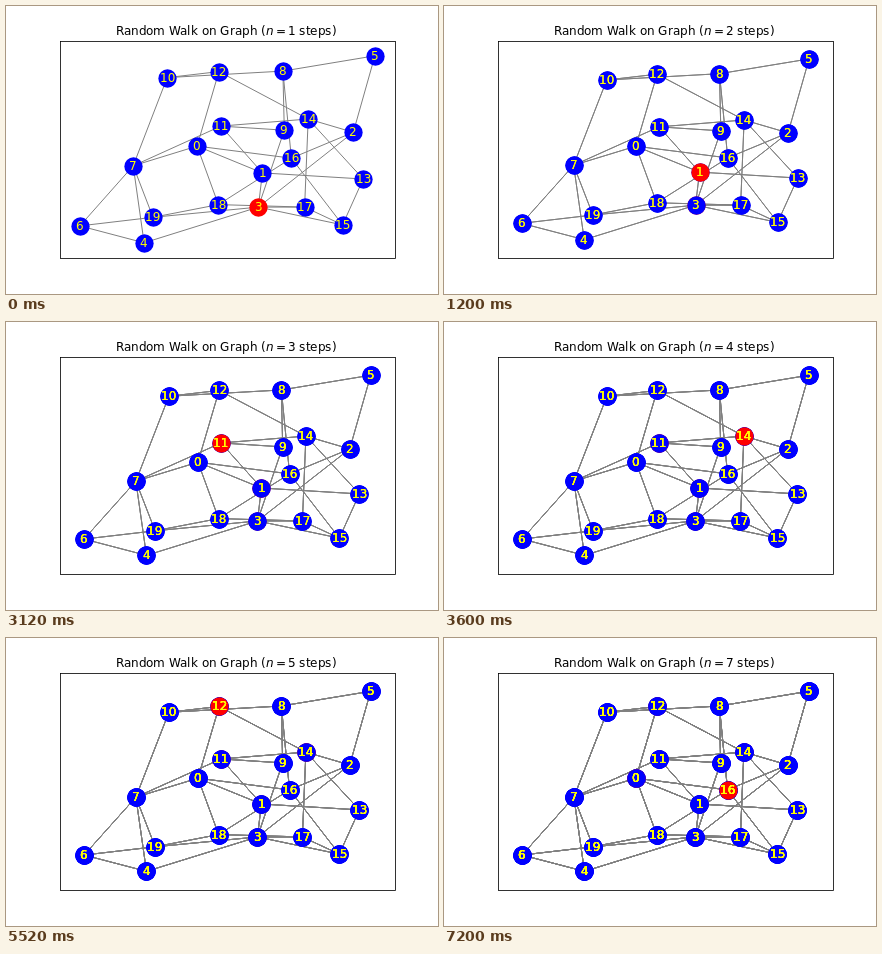
Write an HTML page that moves like this. It is 432 px wide and 288 px high and loops after 8 s.

```html
<!DOCTYPE html>
<html lang="en">
<head>
<meta charset="utf-8">
<title>Random walk on a graph</title>
<style>
  html, body { margin: 0; width: 100%; height: 100%; overflow: hidden; background: #fff; }
  svg { display: block; width: 432px; height: 288px; }
  text { font: 12px "DejaVu Sans", sans-serif; white-space: pre; }
  .edges { fill: none; stroke: #808080; stroke-width: 1; }
  .labels { fill: #ff0; }
  .frame { fill: none; stroke: #000; stroke-width: .8; }
</style>
</head>
<body>
<svg viewBox="0 0 432 288">
  <g id="graph"></g>
  <rect class="frame" x="54.5" y="35.5" width="335" height="217"/>
  <text id="title" y="29"></text>
</svg>
<script>
const STEP = 1200, LOOP = 8000;
const CX = 221.4, CY = 143.28, RADIUS = 9.16, SIZE = 12;

const nodes = [
  [191.1, 140.1], [256.4, 166.9], [347.3, 126.3], [252.35, 201.1], [138.1, 236.8],
  [368.9, 49.8], [73.9, 219.9], [127.2, 159.8], [276.9, 65.1], [278.3, 124.2],
  [161.2, 71.6], [214.9, 120.1], [212.9, 65.6], [357.2, 173], [302.2, 113],
  [336.6, 218.9], [285.4, 152.2], [298.6, 201.1], [212.4, 198.6], [147, 211.3]
];

// Small-world ring: node i links to i + 1 and i + 2, unless that link is rewired.
const rewired = {
  1: { 1: 13, 4: 7, 5: 2, 7: 0, 9: 3, 10: 7, 11: 1, 12: 0, 14: 2, 16: 8, 19: 3 },
  2: { 0: 16, 2: 16, 3: 15, 5: 8, 6: 19, 7: 11, 11: 14, 14: 17, 17: 3, 19: 7 }
};
const edges = nodes.flatMap((_, i) =>
  [1, 2].map(hop => [i, rewired[hop][i] ?? (i + hop) % nodes.length]));

const walk = [3, 1, 11, 14, 12, 0, 16];

const graph = document.getElementById("graph");
const title = document.getElementById("title");
const pen = document.createElement("canvas").getContext("2d");

// Measured large, so that the width is free of rounding.
function widthOf(text, style = "normal") {
  pen.font = `${style} ${SIZE * 100}px "DejaVu Sans", sans-serif`;
  return pen.measureText(text).width / 100;
}

// The axis limits widen with each redraw and soon settle.
function place(step) {
  const grown = 1 - .1 ** step;
  const sx = 1 - .0285 * grown, sy = 1 - .0371 * grown;
  return nodes.map(([x, y]) => [CX + (x - CX) * sx, CY + (y - CY) * sy]);
}

function edgeLayer(pts) {
  return edges.map(([a, b]) => `<path d="M${pts[a]}L${pts[b]}"/>`).join("");
}

// Discs sit on whole pixels; edges do not.
function nodeLayer(pts, current) {
  return pts.map(([x, y], i) =>
    `<circle cx="${Math.round(x) + .5}" cy="${Math.round(y) + .5}" r="${RADIUS}"
      fill="${i === current ? "#f00" : "#00f"}"/>`).join("");
}

function labelLayer(pts) {
  return pts.map(([x, y], i) => {
    const left = Math.round(x - widthOf(String(i)) / 2);
    return `<text x="${left}" y="${Math.round(y) + 4}">${i}</text>`;
  }).join("");
}

// Each title glyph starts on a whole pixel.
function titleRuns(n) {
  const gap = widthOf("m") / 5;
  let left = 110;
  const run = (text, space = 0, style = "normal") => {
    left += space;
    const xs = [...text].map((_, i) => Math.floor(left + widthOf(text.slice(0, i + 1), style) - widthOf(text[i], style)));
    left += widthOf(text, style);
    return `<tspan x="${xs.join(" ")}" font-style="${style}">${text}</tspan>`;
  };
  return run("Random Walk on Graph (") + run("n", 0, "italic") +
    run("=", gap) + run(String(n), gap) + run(" steps)");
}

// Every step paints over the earlier ones, so soft edges grow heavier.
function draw(step) {
  const pts = place(step), n = step + 1;
  graph.innerHTML =
    `<g class="edges">${edgeLayer(pts).repeat(n)}</g>` +
    walk.slice(0, n).map(node => nodeLayer(pts, node)).join("") +
    `<g class="labels">${labelLayer(pts).repeat(n)}</g>`;
  title.innerHTML = titleRuns(n);
}

const start = performance.now();
let shown = -1;

function tick() {
  const step = Math.floor((performance.now() - start) % LOOP / STEP);
  if (step !== shown) draw(shown = step);
  requestAnimationFrame(tick);
}
tick();
</script>
</body>
</html>
```
